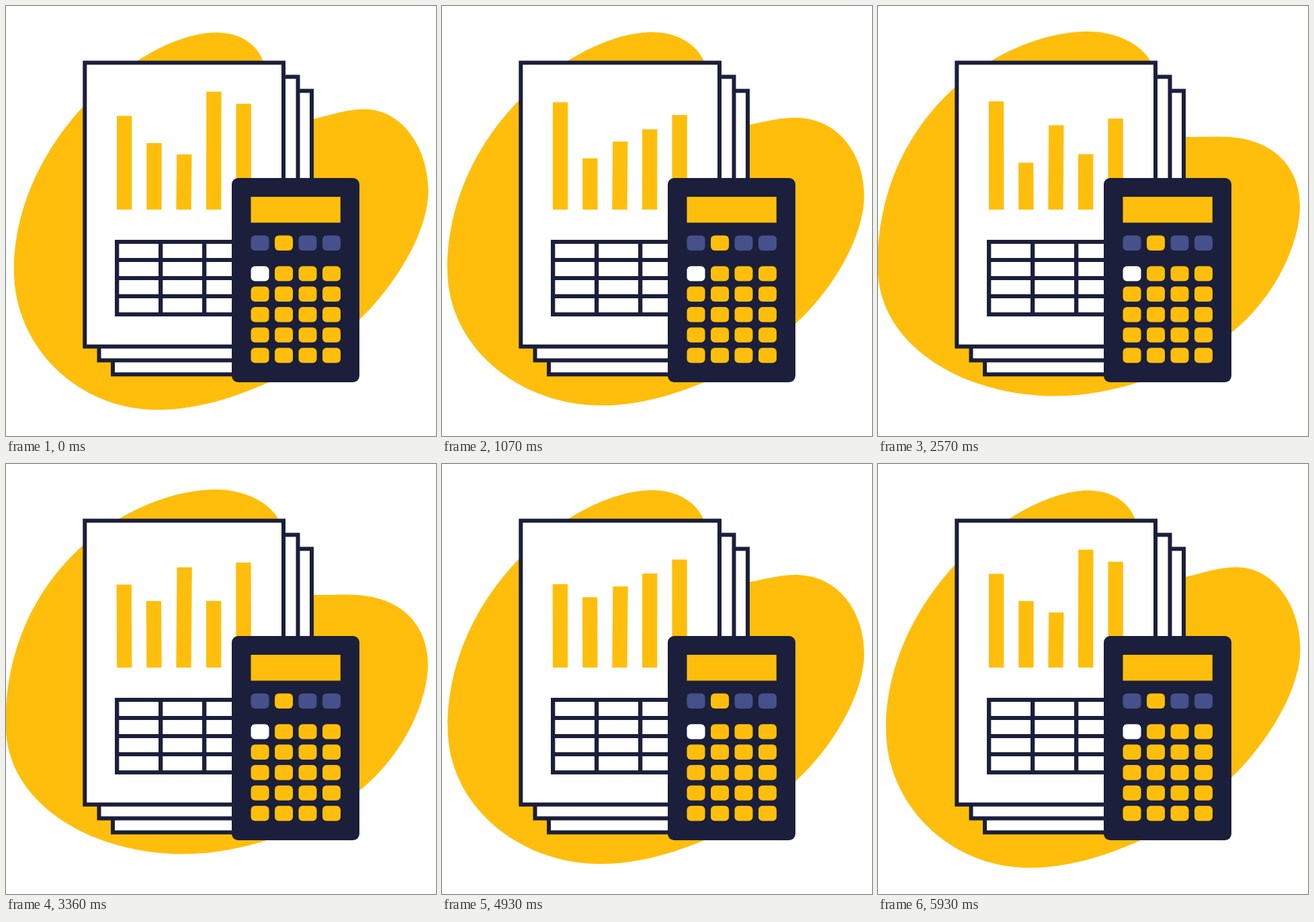
An HTML page with a canvas for the animation above (6000 ms loop, 640x640 px).

```html
<!DOCTYPE html>
<html lang="en">
<head>
<meta charset="utf-8">
<title>Report and calculator</title>
<style>
  html, body { margin: 0; width: 100%; height: 100%; overflow: hidden; background: #fff; }
  canvas { display: block; width: 100vw; height: 100vh; }
</style>
</head>
<body>
<canvas id="stage" width="640" height="640"></canvas>
<script>
const ctx = document.getElementById('stage').getContext('2d');
const AMBER = '#ffbe0b', NAVY = '#1b1f3b', BLUE = '#46508c', WHITE = '#fff';
const LOOP = 6000, STEPS = 84, LINE = 6;

// Start point, then three points per cubic segment.
const BLOB_A = [
  313, 39.5, 352, 39.5, 375, 60, 383, 83,
  400, 135, 405, 180, 458, 168,
  485, 162, 508, 153.5, 533, 153.5,
  590, 153.5, 628.5, 212, 628.5, 275,
  628.5, 340, 575, 420, 526, 467,
  490, 508, 440, 538, 391, 560,
  340, 583, 283, 601, 226, 601,
  105, 601, 12, 505, 12, 395,
  12, 195, 205, 39.5, 313, 39.5
];
const BLOB_B = [
  313, 38, 355, 38, 392, 57, 406, 83,
  420, 140, 425, 196, 458, 195,
  475, 195, 490, 194.5, 510, 194.5,
  588, 194.5, 628, 240, 628, 298,
  628, 352, 592, 434, 526, 486,
  490, 520, 440, 543, 388, 560,
  352, 571.5, 308, 580.5, 265, 580.5,
  128, 580.5, -0.5, 506, -0.5, 388,
  -0.5, 156, 188, 38, 313, 38
];
const BLOB_GAIN = 1 / 0.952;

// Bar tops at the three key poses, plus the small sideways lean of the top.
const BARS = [
  { x: 165, tops: [163.5, 127.6, 193.8], lean: [0, 0, -0.6] },
  { x: 209.3, tops: [204, 244.4, 192.9], lean: [0, -0.2, -0.7] },
  { x: 253.3, tops: [221, 186.7, 144.7], lean: [0.9, 0.8, 1.3] },
  { x: 298, tops: [127.5, 227, 197.2], lean: [0.2, 0, 0] },
  { x: 342.5, tops: [145.5, 175.3, 138.9], lean: [0, 0, -0.3] }
];
const BAR_W = 22.3, BAR_BASE = 303;

const mix = (a, b, p) => a + (b - a) * p;
const ease = u => u * u * (3 - 2 * u);

function cycle(keys, u) {
  const pos = u * keys.length;
  const i = Math.min(Math.floor(pos), keys.length - 1);
  return mix(keys[i], keys[(i + 1) % keys.length], ease(pos - i));
}

function box(x, y, w, h, color, r = 0) {
  ctx.fillStyle = color;
  ctx.beginPath();
  ctx.roundRect(x, y, w, h, r);
  ctx.fill();
}

function drawBlob(u) {
  const p = ease(1 - Math.abs(2 * u - 1)) * BLOB_GAIN;
  const pts = BLOB_A.map((v, i) => mix(v, BLOB_B[i], p));
  ctx.fillStyle = AMBER;
  ctx.beginPath();
  ctx.moveTo(pts[0], pts[1]);
  for (let i = 2; i < pts.length; i += 6) ctx.bezierCurveTo(...pts.slice(i, i + 6));
  ctx.fill();
}

function drawPage(x, y, w, h) {
  ctx.fillStyle = WHITE;
  ctx.strokeStyle = NAVY;
  ctx.lineWidth = LINE;
  ctx.fillRect(x, y, w, h);
  ctx.strokeRect(x, y, w, h);
}

function drawBar({ x, tops, lean }, u) {
  const y = cycle(tops, u), left = x + cycle(lean, u);
  ctx.fillStyle = AMBER;
  ctx.beginPath();
  ctx.moveTo(left, y);
  ctx.lineTo(left + BAR_W, y);
  ctx.lineTo(x + BAR_W, BAR_BASE);
  ctx.lineTo(x, BAR_BASE);
  ctx.fill();
}

function drawTable() {
  for (let r = 0; r < 5; r++) box(162, 348 + r * 27, 190, LINE, NAVY);
  for (let c = 0; c < 3; c++) box(162 + c * 65, 348, LINE + 0.3, 114, NAVY);
}

function drawCalculator() {
  box(336, 256, 190, 304, NAVY, 9.5);
  box(364.5, 284, 133.3, 38.4, AMBER);
  for (let row = 0; row < 6; row++) {
    const y = row ? 387.2 + (row - 1) * 30.4 : 341.5;
    for (let col = 0; col < 4; col++) {
      let color = AMBER;
      if (row === 0 && col !== 1) color = BLUE;
      if (row === 1 && col === 0) color = WHITE;
      box(364.5 + col * 35.5, y, 27, 22.4, color, 6);
    }
  }
}

function draw(u) {
  ctx.fillStyle = WHITE;
  ctx.fillRect(0, 0, 640, 640);
  drawBlob(u);
  drawPage(159, 126.3, 296, 422);
  drawPage(138.5, 105.4, 296, 422);
  drawPage(117.3, 84.4, 295.7, 422.4);
  BARS.forEach(bar => drawBar(bar, u));
  drawTable();
  drawCalculator();
}

const start = performance.now();
function tick(now) {
  const t = Math.max(0, now - start) % LOOP;
  const step = Math.floor(t / LOOP * STEPS + 0.1) % STEPS;
  draw(step / (STEPS - 1));
  requestAnimationFrame(tick);
}
draw(0);
requestAnimationFrame(tick);
</script>
</body>
</html>
```
